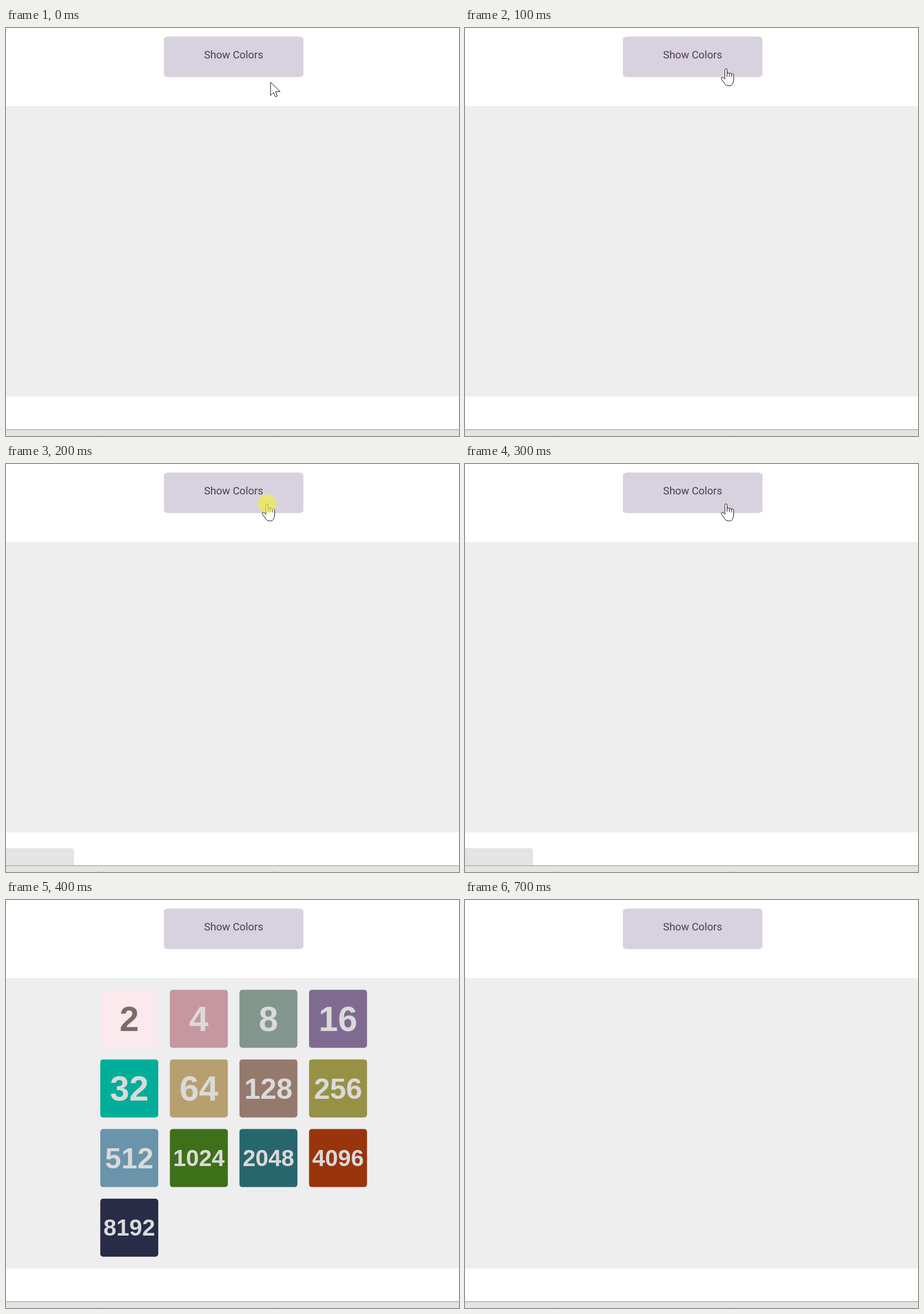
An HTML page for the animation above (800 ms loop, 789 by 710 pixels).

```html
<!DOCTYPE html>
<html lang="en">
<head>
<meta charset="utf-8">
<title>Show Colors</title>
<style>
  html, body { margin: 0; width: 100%; height: 100%; overflow: hidden; background: #fff; }
  svg { display: block; width: 789px; height: 710px; }
  text { text-anchor: middle; }
  .label { font: 18.4px Roboto, sans-serif; fill: #493f50; }
  #tiles text { font-family: "Liberation Sans", Arial, sans-serif; font-weight: bold; }
  .cursor { fill: #fff; stroke: #111; stroke-width: 1; stroke-linejoin: round; stroke-linecap: round; }
</style>
</head>
<body>
<svg viewBox="0 0 789 710">
  <rect x="275" y="14.7" width="243" height="70.8" rx="10" ry="4.5" fill="#d8d2df"/>
  <text class="label" x="396.5" y="52.5">Show Colors</text>
  <rect y="136" width="789" height="505" fill="#eee"/>
  <g id="tiles"></g>

  <path id="bubble" d="M0 668.5H113.5q5 0 5 5V698H0z" fill="#e4e4e4"/>
  <rect y="698.5" width="789" height="12" fill="#e4e4e4"/>
  <rect y="698.5" width="789" height="1" fill="#929292"/>
  <path d="M161.5 708v2M467 708v2" stroke="#aaa"/>

  <path id="arrow" class="cursor" d="M460.8 94.8V117.3L466 112.3 469.3 119.8 472.6 118.5 469.5 111 477 110.6z"/>
  <g id="hand" class="cursor">
    <path d="M452.7 88V72.3a1.9 1.9 0 0 1 3.8 0V79q0-1.6 1.8-1.6 2 0 2 2 .2-1.3 1.9-1.3 2 0 2 2.2 .4-1 1.7-1 2 0 2 2.5V90q0 3-1.5 5.5-1 4.7-7.2 4.7-4.5 0-6.6-3.4L446.8 88.600q-1.300-2.500 .5-3.300 1.500-.6 3 .9z"/>
    <path d="M456.500 79v5M460.300 79.400v5M464.200 80.300v4.500" fill="none"/>
  </g>
  <circle id="click" cx="454.600" cy="69" r="16" fill="#f5f03a" opacity=".65"/>
</svg>
<script>
  const LOOP = 800;
  const PITCH = 121.2;
  const TILE = 101;
  const colors = ["#fce9ed", "#c697a0", "#82968e", "#7f6b91", "#00ad98", "#b79f70", "#96796d",
                  "#979145", "#6a94aa", "#3e7019", "#28666d", "#99340d", "#282c47"];
  const $ = id => document.getElementById(id);

  $("tiles").innerHTML = colors.map((color, i) => {
    const value = 2 ** (i + 1);
    const x = 164.2 + (i % 4) * PITCH;
    const y = 156.2 + Math.floor(i / 4) * PITCH;
    const size = value < 100 ? 60.6 : value < 1000 ? 50.5 : 40.4;
    return `<rect x="${x}" y="${y}" width="${TILE}" height="${TILE}" rx="5" fill="${color}"/>
      <text x="${x + TILE / 2}" y="${y + TILE / 2 + size * 0.35}" font-size="${size}"
        fill="${i ? "#dadada" : "#776e65"}">${value}</text>`;
  }).join("");

  function draw(now) {
    const t = now % LOOP;
    const show = (id, from, to) =>
      $(id).setAttribute("visibility", t >= from && t < to ? "visible" : "hidden");
    show("arrow", 0, 100);
    show("hand", 100, 400);
    show("click", 200, 300);
    show("bubble", 200, 400);
    show("tiles", 400, 700);
    $("hand").setAttribute("transform", `translate(0 ${t < 200 ? 0.5 : -1})`);
    requestAnimationFrame(draw);
  }
  draw(performance.now());
</script>
</body>
</html>
```
